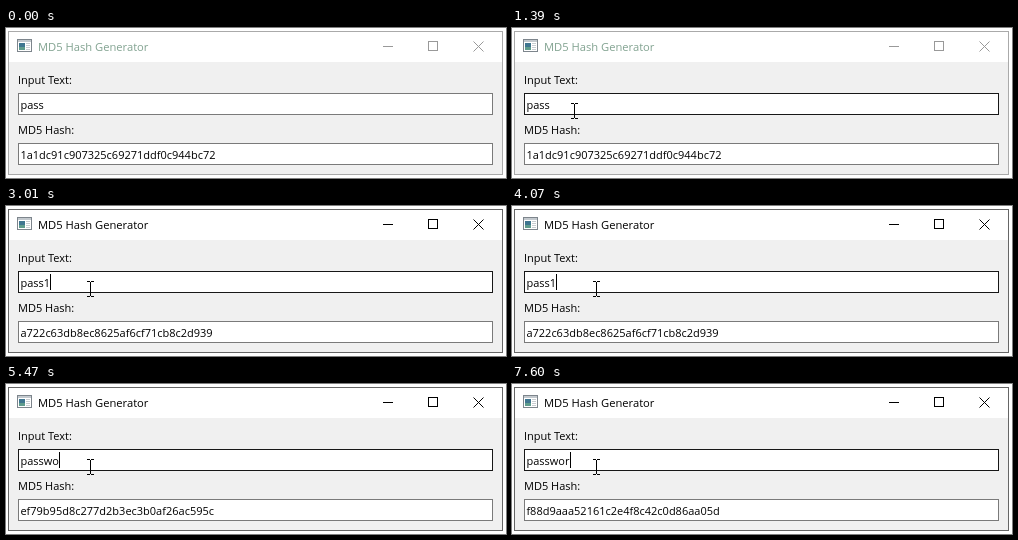
These frames come from a looping animation (500 px wide and 150 px high, 8000 ms). An HTML page:

```html
<!DOCTYPE html>
<html lang="en">
<head>
<meta charset="utf-8">
<title>MD5 Hash Generator</title>
<style>
  html, body { margin: 0; width: 100%; height: 100%; overflow: hidden; background: #fff; }
  svg { display: block; }
  text { font: 11px "Open Sans", "Noto Sans", sans-serif; fill: #000; white-space: pre; }
  .box { fill: #fff; stroke: #7a7a7a; }
  .hover { stroke: #171717; }
  #frame { fill: none; stroke: #aaa; }
  #title { font-size: 11.2px; fill: #82a391; }
  #buttons { fill: none; stroke: #999; }
  .active #frame { stroke: #666; }
  .active #title { fill: #000; }
  .active #buttons { stroke: #000; }
</style>
</head>
<body>
<svg id="window" width="500" height="150" shape-rendering="crispEdges">
  <rect x="2" y="3" width="495" height="144" fill="#fff"/>
  <rect x="3" y="34" width="493" height="112" fill="#f0f0f0"/>
  <rect id="frame" x="2.5" y="3.5" width="494" height="143"/>

  <g id="icon">
    <rect x="11.5" y="11.5" width="14" height="12" fill="#fff" stroke="#7d858c"/>
    <rect x="12" y="12" width="13" height="2" fill="#c3c9ce"/>
    <rect x="13" y="15" width="6" height="7" fill="#3f7690"/>
    <rect x="13" y="19" width="6" height="3" fill="#5f9c8c"/>
    <path d="M20 15.5h4M20 17.5h4M20 19.5h4M20 21.5h4" stroke="#c8cdd1"/>
  </g>
  <text id="title" x="31.9" y="23">MD5 Hash Generator</text>
  <g id="buttons">
    <path d="M377 18.5h10"/>
    <rect x="422.5" y="13.5" width="9" height="9"/>
    <path d="M467.5 13.5l10 10m0-10l-10 10" shape-rendering="auto"/>
  </g>

  <text x="12" y="56">Input Text:</text>
  <rect id="field" class="box" x="12.5" y="65.5" width="474" height="21"/>
  <text id="input" x="14.4" y="81"></text>
  <rect id="caret" y="68" width="1" height="16"/>

  <text x="12" y="106">MD5 Hash:</text>
  <rect class="box" x="12.5" y="115.5" width="474" height="21"/>
  <text id="hash" x="14.4" y="131"></text>

  <path id="arrow" d="M.5 .5v15l3.5-3.3 2.5 6 2-1-2.5-5.7h5z" fill="#fff" stroke="#000" shape-rendering="auto"/>
  <path id="beam" d="M-3 0h3v1h1v-1h3v1h-3v14h3v1h-3v-1h-1v1h-3v-1h3v-14h-3z"/>
</svg>
<script>
const LOOP = 8000;
const $ = id => document.getElementById(id);

// Each entry changes only the listed parts of the state.
const events = [
  [0, { text: "pass", caret: false, active: false, hover: false, pointer: "", at: [0, 0] }],
  [1120, { pointer: "arrow", at: [57, 103] }],
  [1210, { pointer: "beam", at: [59, 79], hover: true }],
  [1300, { at: [61, 76] }],
  [1390, { at: [62, 75] }],
  [1590, { active: true, caret: true }],
  [1660, { at: [67, 75] }],
  [1730, { at: [76, 75] }],
  [1800, { at: [82, 75] }],
  [2150, { at: [83, 75], caret: false }],
  [2220, { at: [84, 75] }],
  [2680, { caret: true }],
  [3010, { text: "pass1" }],
  [3540, { caret: false }],
  [4070, { caret: true }],
  [4140, { text: "pass" }],
  [4730, { caret: false }],
  [4990, { text: "passw", caret: true }],
  [5470, { text: "passwo" }],
  [5870, { text: "passwor" }],
  [6200, { text: "password" }],
  [6790, { caret: false }],
  [7320, { caret: true }],
  [7600, { text: "passwor" }],
];

// MD5 of a short ASCII string (a single 64-byte block).
function md5(s) {
  const shifts = [[7, 12, 17, 22], [5, 9, 14, 20], [4, 11, 16, 23], [6, 10, 15, 21]];
  const start = [0x67452301, 0xefcdab89, 0x98badcfe, 0x10325476];
  const words = new Uint32Array(16);
  [...s, "\x80"].forEach((ch, i) => words[i >> 2] |= ch.charCodeAt(0) << 8 * (i % 4));
  words[14] = s.length * 8;
  let [a, b, c, d] = start;
  for (let i = 0; i < 64; i++) {
    const round = i >> 4;
    const mix = [b & c | ~b & d, d & b | ~d & c, b ^ c ^ d, c ^ (b | ~d)][round];
    const word = words[[i, 5 * i + 1, 3 * i + 5, 7 * i][round] % 16];
    const sum = a + mix + Math.floor(2 ** 32 * Math.abs(Math.sin(i + 1))) + word | 0;
    const n = shifts[round][i % 4];
    [a, b, c, d] = [d, b + (sum << n | sum >>> 32 - n) | 0, b, c];
  }
  const hexByte = (v, j) => (v >>> 8 * j & 255).toString(16).padStart(2, "0");
  return [a, b, c, d].map((v, i) => [0, 1, 2, 3].map(j => hexByte(v + start[i], j)).join("")).join("");
}

function show(id, visible) {
  $(id).setAttribute("visibility", visible ? "visible" : "hidden");
}

function draw(now) {
  const t = now % LOOP;
  const state = Object.assign({}, ...events.filter(([time]) => time <= t).map(([, change]) => change));

  $("window").classList.toggle("active", state.active);
  $("field").classList.toggle("hover", state.hover);
  $("input").textContent = state.text;
  $("hash").textContent = md5(state.text);

  $("caret").setAttribute("x", Math.round(14.7 + $("input").getComputedTextLength()));
  show("caret", state.caret);
  for (const id of ["arrow", "beam"]) {
    $(id).setAttribute("transform", `translate(${state.at})`);
    show(id, state.pointer === id);
  }
  requestAnimationFrame(() => draw(performance.now() - begin));
}

const begin = performance.now();
draw(0);
</script>
</body>
</html>
```
